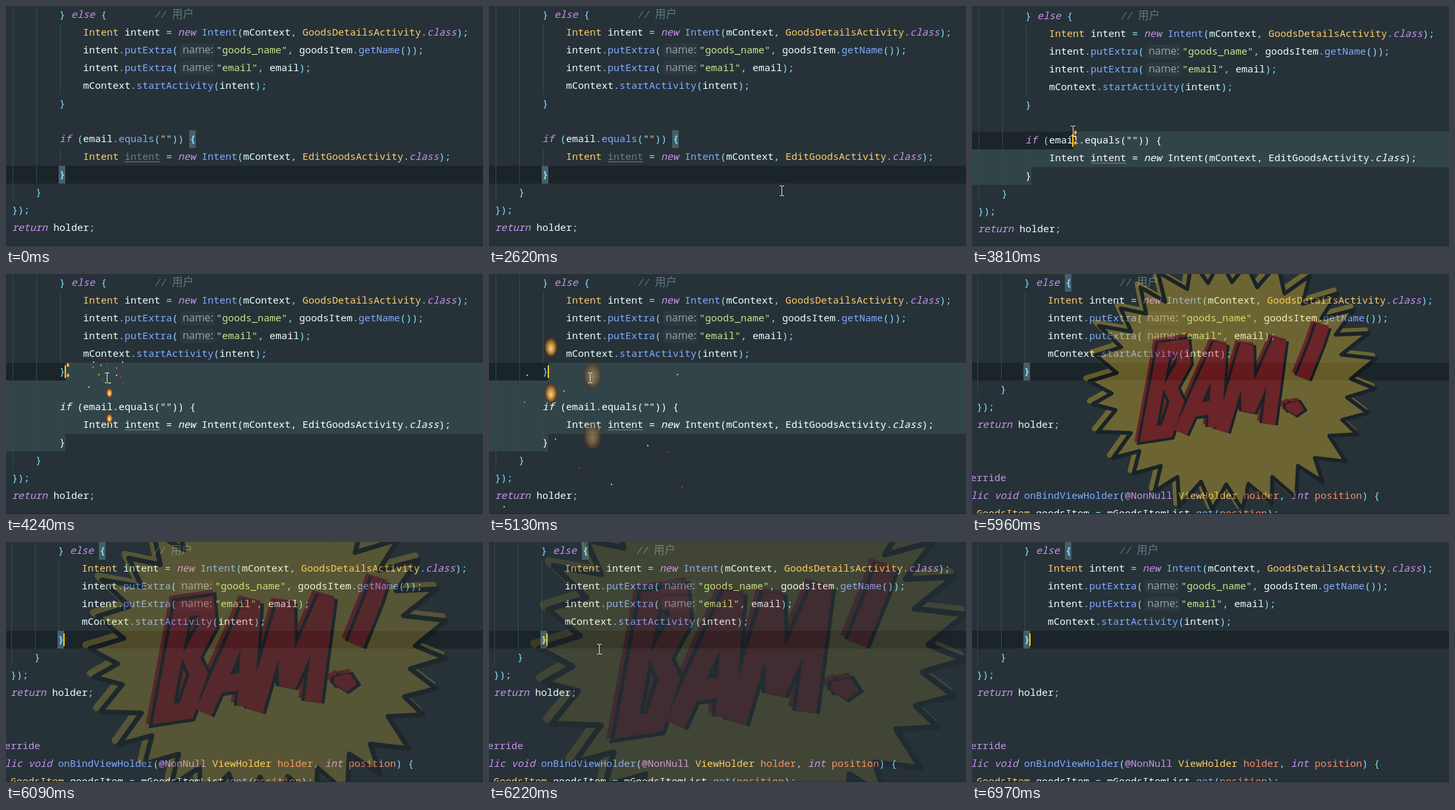
An HTML page with a canvas for the animation above (7120 ms loop, 724 by 365 pixels).

```html
<!DOCTYPE html>
<html lang="en">
<head>
<meta charset="utf-8">
<title>Code editor with power effects</title>
<style>
html, body { margin: 0; width: 100%; height: 100%; overflow: hidden; background: #263238; }
canvas { display: block; }
</style>
</head>
<body>
<canvas id="stage" width="724" height="365"></canvas>
<script>
const W = 724, H = 365, ROW = 27, CH = 9, LOOP = 7120;
const MONO = '"Noto Sans Mono", "Noto Sans CJK SC", monospace';
const stage = document.getElementById('stage');
const ctx = stage.getContext('2d');
const layer = Object.assign(document.createElement('canvas'), { width: W, height: H });
const lctx = layer.getContext('2d');

const COLOR = {
  bg: '#263238', line: '#1b2429', select: '#314549', guide: '#37474f', match: '#465f67',
  text: '#eeffff', key: '#c792ea', type: '#ffcb6b', call: '#82aaff', string: '#c3e88d',
  punct: '#89ddff', note: '#637780', unused: '#6f7d83', param: '#f78c6c', caret: '#ffcc00',
  hint: '#2d393f', hintText: '#96a3a8', pointer: '#e4e8e9', squiggle: '#7d898d'
};
const KEYWORD = /^(else|if|return|new|class|public|void|int)$/;
const HAN = /[一-龥]/;

// Key moments in ms
const MOVE = 2620, SHAKE = 3280, SELECT = 3550, REACH = 3950, DELETE = 5280, BAM = 5407;
const RETURN = 6220, LEAVE = 6600;

// [row, column, text]; ¦ marks a parameter hint
const HEAD = [
  [0, 8, '} else {        // 用户'],
  [1, 12, 'Intent intent = new Intent(mContext, GoodsDetailsActivity.class);'],
  [2, 12, 'intent.putExtra(¦"goods_name", goodsItem.getName());'],
  [3, 12, 'intent.putExtra(¦"email", email);'],
  [4, 12, 'mContext.startActivity(intent);'],
  [5, 8, '}']
];
const BEFORE = [...HEAD,
  [7, 8, 'if (email.equals("")) {'],
  [8, 12, 'Intent intent = new Intent(mContext, EditGoodsActivity.class);'],
  [9, 8, '}'], [10, 4, '}'], [11, 0, '});'], [12, 0, 'return holder;']
];
const AFTER = [...HEAD,
  [6, 4, '}'], [7, 0, '});'], [8, 0, 'return holder;'],
  [11, -4, '@Override'],
  [12, -4, 'public void onBindViewHolder(@NonNull ViewHolder holder, int position) {'],
  [13, 0, 'GoodsItem goodsItem = mGoodsItemList.get(position);']
];

const CARETS = [
  { from: 0, row: 9, x: 90 },
  { from: SELECT, row: 7, x: 153 },
  { from: REACH, row: 5, x: 90 }
];

const clamp = v => Math.max(0, Math.min(1, v));
const lerp = (a, b, u) => a + (b - a) * u;
const rand = n => { const v = Math.sin(n * 12.9898) * 43758.5453; return v - Math.floor(v); };

// The screen is static at first, then refreshes 7.5 times a second.
const refresh = t => t < MOVE ? 0 : MOVE + Math.floor((t - MOVE + 25) * 3 / 400) * 400 / 3;

function rect(color, x, y, w, h) {
  ctx.fillStyle = color;
  ctx.fillRect(x, y, w, h);
}

function tokenColor(word, next, row) {
  if (KEYWORD.test(word) || word[0] === '@') return COLOR.key;
  if (word[0] === '"') return COLOR.string;
  if (word === '//' || HAN.test(word)) return COLOR.note;
  if (!/\w/.test(word)) return COLOR.punct;
  if (next === '(') return COLOR.call;
  if (/^[A-Z]/.test(word)) return COLOR.type;
  if (word === 'position' || (word === 'holder' && next === ',')) return COLOR.param;
  if (word === 'intent' && row === 8) return COLOR.unused;
  return COLOR.text;
}

function drawHint(x, y) {
  ctx.fillStyle = COLOR.hint;
  ctx.beginPath();
  ctx.roundRect(x + 3, y + 3, 53, 21, 4);
  ctx.fill();
  ctx.font = '16px "Open Sans", sans-serif';
  ctx.fillStyle = COLOR.hintText;
  ctx.fillText('name:', x + 7, y + 18);
}

function drawLine([row, col, text], white) {
  let x = 9 + col * CH;
  const y = row * ROW;
  for (const m of text.matchAll(/"[^"]*"|\/\/|@?\w+|\s+|[一-龥]+|[^\s\w"]/g)) {
    const word = m[0];
    if (word === '¦') { drawHint(x, y); x += 58; continue; }
    const italic = KEYWORD.test(word) || word === '//';
    ctx.font = `${italic ? 'italic ' : ''}${HAN.test(word) ? 16.5 : 15}px ${MONO}`;
    ctx.fillStyle = white ? '#ffffff' : tokenColor(word, text[m.index + word.length], row);
    ctx.fillText(word, x, y + 18);
    x += word.length * CH;
  }
}

function drawSquiggle() {
  ctx.strokeStyle = COLOR.squiggle;
  ctx.lineWidth = 1;
  ctx.beginPath();
  for (let x = 180; x <= 234; x += 2) ctx.lineTo(x, 236 + x % 4);
  ctx.stroke();
}

function drawCode(t, white) {
  const deleted = t >= DELETE, shift = deleted ? 4 : 0;
  rect(COLOR.guide, 10, 0, 1, (11 - shift) * ROW);
  rect(COLOR.guide, 46, 0, 1, (10 - shift) * ROW);
  rect(COLOR.guide, 82, ROW, 1, 4 * ROW);
  if (!deleted) {
    rect(COLOR.guide, 82, 8 * ROW, 1, ROW);
    drawSquiggle();
  }
  for (const line of deleted ? AFTER : BEFORE) drawLine(line, white);
}

function drawMatch(row, x, bracket) {
  rect(COLOR.match, x - 1, row * ROW, 10, ROW);
  ctx.font = `bold 15px ${MONO}`;
  ctx.fillStyle = COLOR.punct;
  ctx.fillText(bracket, x, row * ROW + 18);
}

function drawSelection(t, { row, x }) {
  ctx.save();
  ctx.beginPath();
  ctx.rect(x, row * ROW, W, ROW);
  ctx.rect(-5, (row + 1) * ROW, W + 10, (8 - row) * ROW);
  ctx.rect(-5, 9 * ROW, 95, ROW);
  ctx.clip();
  rect(COLOR.select, -5, 0, W + 10, H);
  drawCode(t, true);
  ctx.restore();
}

// Each caret move sends one flame up and one down.
function drawFlames({ from, row, x }, t) {
  const age = t - from, alpha = clamp(1 - (age - 1100) / 800);
  if (from === 0 || age < 0 || alpha === 0) return;
  const size = lerp(4, 27, clamp(age / 1560) ** 1.6);
  const glow = ctx.createRadialGradient(0, .2, 0, 0, 0, 1.1);
  glow.addColorStop(0, '#fff0b0');
  glow.addColorStop(.4, '#e6a444');
  glow.addColorStop(.8, '#75431c');
  glow.addColorStop(1, '#3a241000');
  for (const side of [-1, 1]) {
    ctx.save();
    ctx.globalAlpha = alpha;
    ctx.translate(x + 4, row * ROW + 11 + side * age * .029);
    ctx.scale(size / 2, size * .75);
    ctx.fillStyle = glow;
    ctx.beginPath();
    ctx.roundRect(-1, -1, 2, 2, .7);
    ctx.fill();
    ctx.restore();
  }
}

function drawSparks(t) {
  const u = (t - 4000) / 1130;
  if (u < 0) return;
  const palette = ['#e0154a', '#f5d020', '#e0782a', '#a8d838'];
  ctx.globalAlpha = clamp((5800 - t) / 500);
  for (let i = 0; i < 14; i++) {
    const x = lerp(150, 8 + rand(i + 1) * 282, u);
    const y = lerp(180, 120 + rand(i + 40) * 240, u) - 260 * u * (1 - u);
    rect(palette[i % 4], Math.round(x), Math.round(y), 2, 2);
  }
  ctx.globalAlpha = 1;
}

function makeBurst() {
  const path = new Path2D(), spikes = 30;
  for (let i = 0; i < spikes * 2; i++) {
    const r = i % 2 ? .8 - .04 * rand(i + 5) : 1 - .08 * rand(i + 9);
    const a = (i + .6 * rand(i + 3)) * Math.PI / spikes;
    path.lineTo(388 + 232 * r * Math.cos(a), 163 + 200 * r * Math.sin(a));
  }
  path.closePath();
  return path;
}

// Letter skeletons in a unit box, slanted and set side by side, then drawn with a fat pen
function makeLetters() {
  const path = new Path2D();
  const add = (skeleton, x, y, width) =>
    path.addPath(new Path2D(skeleton), new DOMMatrix([width, -width * .15, -24, 130, x + 24, y]));
  add('M0 1V0H.8L1 .2L.6 .48L1 .66L.8 1Z', 262, 110, 36);
  add('M0 1L.7 0L1 1M.2 .75H.9', 312, 108, 52);
  add('M0 1L.2 0L.5 .8L.9 0L1 1', 375, 106, 72);
  add('M.7 0L.6 .2L.3 .6M.1 .91L.2 .95L.1 .97Z', 478, 78, 40);
  return path;
}
const BURST = makeBurst(), LETTERS = makeLetters();

function inkPath(path, color, width, offset = 0) {
  lctx.save();
  lctx.translate(offset, offset);
  lctx.strokeStyle = color;
  lctx.lineWidth = width;
  lctx.stroke(path);
  lctx.restore();
}

function drawBam(t) {
  const scale = (t - BAM) / 553, alpha = .12 + (6220 - t) * .2 / 260;
  if (scale <= 0 || alpha <= 0) return;
  const yellow = '#fdce2b', red = '#fb0806', ink = '#030607';
  lctx.resetTransform();
  lctx.clearRect(0, 0, W, H);
  lctx.translate(387, 166);
  lctx.scale(scale, scale);
  lctx.translate(-387, -166);
  lctx.lineJoin = 'round';
  lctx.fillStyle = yellow;
  lctx.fill(BURST);
  inkPath(BURST, yellow, 8);
  inkPath(BURST, ink, 6, 5);
  lctx.lineJoin = 'miter';
  lctx.miterLimit = 2;
  inkPath(LETTERS, red, 28);
  inkPath(LETTERS, ink, 29, 4);
  inkPath(LETTERS, red, 21, 4);
  ctx.globalAlpha = alpha;
  ctx.drawImage(layer, 0, 0);
  ctx.globalAlpha = 1;
}

function drawIBeam(x, y) {
  x = Math.round(x);
  y = Math.round(y);
  rect(COLOR.pointer, x, y - 7, 1, 14);
  for (const end of [y - 8, y + 7]) {
    rect(COLOR.pointer, x - 3, end, 3, 1);
    rect(COLOR.pointer, x + 1, end, 3, 1);
  }
}

// Glides in from the right, then drags upwards.
function drawPointer(t) {
  if (t >= MOVE && t < DELETE) {
    const x = 153 + 291 * Math.exp((MOVE - t) / 155);
    drawIBeam(x, 281 - 18 * clamp((t - MOVE) / 430) - 105 * clamp((t - 3170) / 930));
  }
  if (t >= RETURN && t < LEAVE) drawIBeam(167, 163);
}

function shakeOffset(t) {
  if (t >= DELETE) return [-2, 0];
  if (t < SHAKE || t > 4050) return [0, 0];
  const phase = (t - 3820) / 60;
  return [Math.round(2 * Math.sin(phase)), Math.round(2 * Math.cos(phase))];
}

function draw(now) {
  const t = refresh(now), deleted = t >= DELETE;
  const caret = CARETS.findLast(c => c.from <= t);
  const band = caret.row * ROW;

  rect(COLOR.bg, 0, 0, W, H);
  ctx.save();
  ctx.translate(...shakeOffset(t));
  rect(COLOR.line, -5, band, W + 10, ROW);
  drawCode(t, false);
  if (t >= SELECT && !deleted) {
    drawSelection(t, caret);
  } else {
    drawMatch(deleted ? 0 : 7, deleted ? 144 : 279, '{');
    drawMatch(caret.row, 81, '}');
  }
  const caretOn = now < 4480 || Math.floor((now + 35) / 500) % 2 === 0;
  if (t >= SHAKE && caretOn) rect(COLOR.caret, caret.x - 1, band + 4, 2, 19);
  ctx.restore();

  rect(COLOR.line, 0, H - 1, W, 1);
  for (const c of CARETS) drawFlames(c, t);
  drawSparks(t);
  drawBam(t);
  drawPointer(t);
}

const start = performance.now();
function tick() {
  draw((performance.now() - start) % LOOP);
  requestAnimationFrame(tick);
}
tick();
</script>
</body>
</html>
```
